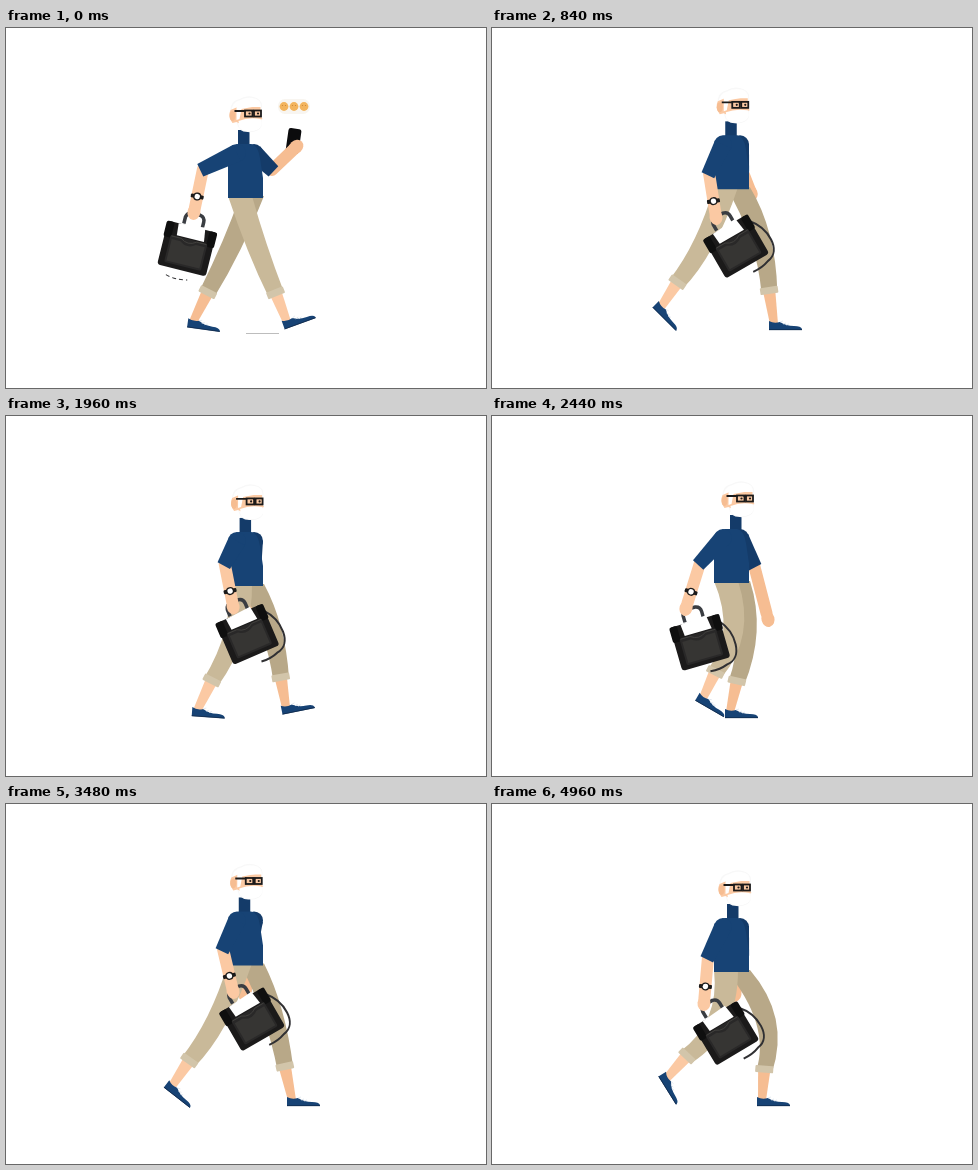
Recreate the animation shown at these times as an HTML page with a canvas. Size 480x360 px, loop 5000 ms.

```html
<!DOCTYPE html>
<html lang="en">
<head>
<meta charset="utf-8">
<title>Walking man</title>
<style>
html, body { margin: 0; width: 100%; height: 100%; overflow: hidden; background: #fff; }
canvas { display: block; }
</style>
</head>
<body>
<canvas id="stage" width="480" height="360"></canvas>
<script>
const ctx = document.getElementById('stage').getContext('2d');
const LOOP = 5000, STRIDE = 1340, STEP = STRIDE / 2, TICK = 40;
const NAVY = '#174375', NAVY_DARK = '#143b69', SKIN = '#fbc9a3', SKIN_DARK = '#f6bd92';
const NEAR_CLOTH = '#c9b999', FAR_CLOTH = '#b8a888', CUFF = '#d2c5aa', BLACK = '#1b1a1a';

// Key poses: time, then values.
const body = [[0, 170, -1], [150, 161, 0], [270, 168, 2], [430, 167, 5], [560, 168.5, 3]]; // hip y, head shift
// knee x, y, ankle x, y, foot angle
const nearLeg = [
  [0, 251, 219, 281, 293, -20], [50, 253, 216, 281, 295, -3], [180, 254, 214, 267, 295, 0],
  [270, 253, 215, 254, 295, 0], [430, 246, 216, 234, 295, 0], [670, 225, 217, 181, 292, 8],
  [800, 211, 217, 166, 281, 38], [840, 212, 216, 169, 278, 45], [940, 227, 218, 175, 273, 58],
  [1100, 243, 216, 211, 281, 30], [1220, 254, 214, 252, 288, 2]];
const farLeg = [
  [0, 226, 217, 187, 293, 8], [100, 227, 215, 179, 286, 24], [180, 236, 214, 184, 275, 45],
  [270, 242, 217, 190, 271, 55], [430, 254, 215, 222, 280, 30], [560, 265, 213, 264, 288, 0],
  [680, 266, 215, 293, 293, -18], [720, 266, 213, 293, 295, -4], [800, 267, 209, 286, 295, 0],
  [840, 269, 209, 282, 295, 0], [940, 276, 217, 270, 295, 0], [1100, 256, 216, 238, 295, 0]];
// elbow x, y, hand x, y
const nearArm = [
  [0, 197, 141, 188, 184], [100, 203, 140, 191, 185], [180, 211, 142, 199, 189],
  [430, 216, 150, 216, 200], [670, 219, 147, 229, 188], [800, 217, 145, 227, 187],
  [840, 217, 145, 224, 189], [940, 216, 153, 212, 199], [1100, 208, 147, 194, 192]];
const farArm = [
  [0, 263, 146, 294, 190], [180, 260, 145, 290, 191], [430, 258, 150, 272, 204],
  [670, 246, 150, 241, 196], [840, 244, 148, 240, 190], [940, 250, 150, 243, 190],
  [1100, 262, 149, 276, 203], [1220, 263, 148, 287, 197]];
const phoneArm = [
  [0, 266, 142, 290, 119], [240, 266, 144, 289, 138], [560, 258, 147, 273, 172],
  [840, 250, 142, 259, 165], [960, 254, 147, 262, 185], [1100, 262, 149, 276, 203]];
// center x, y, angle
const bagKeys = [
  [0, 181, 220, 14], [100, 180, 219, 21], [180, 185, 220, 23], [430, 213, 230, 0],
  [670, 247, 215, -28], [800, 246, 215, -30], [840, 244, 218, -30], [940, 234, 229, -31],
  [1100, 208, 226, -16]];

// Smooth periodic interpolation through the keys.
function sample(keys, time, period) {
  const t = time % period, n = keys.length;
  const key = i => {
    const k = keys[(i + n) % n], shift = Math.floor(i / n) * period;
    return [k[0] + shift, ...k.slice(1)];
  };
  let i = n - 1;
  while (keys[i][0] > t) i--;
  const [p, a, b, q] = [i - 1, i, i + 1, i + 2].map(key);
  const span = b[0] - a[0], u = (t - a[0]) / span;
  return a.slice(1).map((v, j) => {
    const w = b[j + 1];
    const ma = (w - p[j + 1]) / (b[0] - p[0]) * span;
    const mb = (q[j + 1] - v) / (q[0] - a[0]) * span;
    const d = w - v;
    return v + u * (ma + u * (3 * d - 2 * ma - mb + u * (ma + mb - 2 * d)));
  });
}

function shape(color, path) {
  ctx.fillStyle = color;
  ctx.fill(new Path2D(path));
}
function stroke(color, width, path) {
  ctx.strokeStyle = color;
  ctx.lineWidth = width;
  ctx.stroke(new Path2D(path));
}
function box(color, x, y, w, h, r = 0) {
  ctx.fillStyle = color;
  ctx.beginPath();
  ctx.roundRect(x, y, w, h, r);
  ctx.fill();
}
function oval(color, x, y, rx, ry = rx, turn = 0) {
  ctx.fillStyle = color;
  ctx.beginPath();
  ctx.ellipse(x, y, rx, ry, turn, 0, 7);
  ctx.fill();
}
function at(x, y, angle, draw) {
  ctx.save();
  ctx.translate(x, y);
  ctx.rotate(angle);
  draw();
  ctx.restore();
}
const rad = deg => deg * Math.PI / 180;
const mix = (a, b, f) => a + (b - a) * f;

function taper(color, x0, y0, x1, y1, w0, w1) {
  const length = Math.hypot(x1 - x0, y1 - y0);
  at(x0, y0, Math.atan2(y1 - y0, x1 - x0), () =>
    shape(color, `M0 ${-w0 / 2}L${length} ${-w1 / 2}V${w1 / 2}L0 ${w0 / 2}Z`));
}

function shoe(x, y, angle) {
  at(x, y, rad(angle), () => {
    shape(NAVY, 'M-5 -2Q0 1 6 -1Q12 3 20 3Q27 3 28 6V7H-5Z');
    stroke('#dfe5ec', 0.8, 'M6 -1l3 -1M9 1l3 -1M12 2l3 -1');
    stroke('#10294a', 0.8, 'M-5 6.7H28');
  });
}

function leg([kx, ky, ax, ay, angle], hx, hy, color) {
  const cx = mix(kx, ax, 0.65), cy = mix(ky, ay, 0.65);
  const shin = Math.atan2(ay - ky, ax - kx);
  taper(color === NEAR_CLOTH ? SKIN : SKIN_DARK, cx, cy, ax, ay + 1, 12, 8);
  shoe(ax, ay, angle);

  const nx = Math.sin(shin) * 8, ny = -Math.cos(shin) * 8;
  const bend = (Math.atan2(ky - hy, kx - hx) + shin) / 2;
  const mx = Math.sin(bend) * 10, my = -Math.cos(bend) * 10;
  const side = s => [
    2 * (kx + s * mx) - (hx + s * 12 + cx + s * nx) / 2,
    2 * (ky + s * my) - (hy + cy + s * ny) / 2];
  const [r, l] = [side(1), side(-1)].map(([x, y]) => [mix(kx, x, 0.75), mix(ky, y, 0.75)]);
  r[0] += mx * 0.25; r[1] += my * 0.25;
  l[0] -= mx * 0.25; l[1] -= my * 0.25;
  shape(color, `M${hx + 12} ${hy}Q${r} ${cx + nx} ${cy + ny}L${cx - nx} ${cy - ny}Q${l} ${hx - 12} ${hy}Z`);
  at(cx, cy, shin, () => box(CUFF, -6, -9, 7, 18, 1));
}

function arm([ex, ey, hx, hy], sx, sy, cloth, skin) {
  ctx.lineCap = 'round';
  stroke(skin, 12, `M${ex} ${ey}L${mix(ex, hx, 0.9)} ${mix(ey, hy, 0.9)}`);
  ctx.lineCap = 'butt';
  oval(skin, hx, hy, 8, 6.5, Math.atan2(hy - ey, hx - ex));
  oval(cloth, sx, sy, 9);
  taper(cloth, sx, sy, mix(sx, ex, 1.08), mix(sy, ey, 1.08), 18, 14);
}

function watch([ex, ey, hx, hy]) {
  at(mix(ex, hx, 0.64), mix(ey, hy, 0.64), Math.atan2(hy - ey, hx - ex) - Math.PI / 2, () => {
    box(BLACK, -6.5, -2, 13, 4, 1);
    oval(BLACK, 0, 0, 4);
    oval('#fff', 0, 0, 2.7);
  });
}

function bag([x, y, angle]) {
  at(x, y, rad(angle), () => {
    if (angle < 0) stroke('#303033', 2, 'M24 -15C37 0 38 27 20 29Q12 32 2 31');
    else {
      ctx.setLineDash([4, 3]);
      stroke('#303033', 1, 'M-14 31Q-4 34 8 31');
      ctx.setLineDash([]);
    }
    stroke('#3a3d42', 3.5, 'M-9 -23V-30Q-8 -35 -3 -35H5Q10 -34 10 -29V-23');
    box(BLACK, -25, -22, 50, 45, 3);
    box('#0f0f0f', -26, -22, 8, 16, 2);
    box('#0f0f0f', 18, -22, 8, 16, 2);
    shape('#fff', 'M-14 -22L13 -24L15 -10H-13Z');
    box('#292828', -19, -9, 38, 28, 2);
    shape('#363533', 'M-17 -5H-8Q0 1 8 -5H17V17H-17Z');
    stroke('#454441', 0.8, 'M-18 -8H-8Q0 -2 8 -8H18');
  });
}

function torso(y) {
  shape(NAVY, `M222 ${y}V${y - 38}Q221 ${y - 52} 233 ${y - 54}H245Q252 ${y - 53} 254 ${y - 40}L257 ${y - 20}V${y}Z`);
}

function head(x, y) {
  at(x, y, 0, () => {
    box(NAVY_DARK, 8.5, 34, 11.5, 18);
    shape('#f8f8f8', 'M1 17Q0 5 10 3Q18 -2 27 2Q34 5 32 14L32 30Q29 37 18 36Q9 36 7 26Z');
    shape('#fff', 'M2 16Q2 6 11 4Q18 0 27 3Q33 6 31 14V30Q28 36 18 35Q10 35 8 26Z');
    shape(SKIN, 'M8 11H31V20L33 23Q28 25 22 23Q14 24 11 28L7 26L3 27Q-2 20 1 14Z');
    shape('#fff', 'M7 8Q16 4 28 10L12 13L10 23L7 24Z');
    oval(SKIN_DARK, 3, 20, 3, 5);
    shape('#fff', 'M9 25Q19 21 31 23Q34 29 29 33Q18 38 10 32Z');
    ctx.strokeStyle = BLACK;
    ctx.lineWidth = 1.8;
    ctx.strokeRect(15.5, 14.5, 7.5, 6);
    ctx.strokeRect(24.5, 14.5, 7, 6);
    stroke(BLACK, 1.8, 'M5 15H16M22 15H25');
    oval(BLACK, 20, 17.5, 1.1);
    oval(BLACK, 28.5, 17.5, 1.1);
  });
}

function phone(x, y, angle) {
  at(x, y, angle, () => box('#0b0b0d', -6.5, -12.5, 13, 25, 2.5));
}

function bubble() {
  box('#f8f5f0', 272, 71, 32, 15, 7);
  for (const x of [278, 288, 298]) {
    oval('#f3b45d', x, 78.5, 4.4);
    oval('#c98533', x - 1.5, 77.5, 0.6);
    oval('#c98533', x + 1.5, 77.5, 0.6);
  }
}

function draw(time) {
  ctx.fillStyle = '#fff';
  ctx.fillRect(0, 0, 480, 360);
  const [hip, lean] = sample(body, time, STEP);
  const pose = keys => sample(keys, time, STRIDE);
  const reach = time < 1100 ? sample(phoneArm, time, LOOP) : pose(farArm);
  const hold = pose(nearArm);

  if (time < TICK) box('#bdbdbd', 240, 305, 33, 1);
  if (time < 240) bubble();
  if (time < 720) phone(reach[2] - 2.5, reach[3] - 6, 0.14 + time / 900);
  arm(reach, 248, hip - 45, NAVY_DARK, SKIN_DARK);
  leg(pose(farLeg), 246, hip - 2, FAR_CLOTH);
  leg(pose(nearLeg), 234, hip - 2, NEAR_CLOTH);
  head(224.5 + lean, hip - 102);
  torso(hip);
  bag(pose(bagKeys));
  arm(hold, 231, hip - 45, NAVY, SKIN);
  watch(hold);
}

const start = performance.now();
function frame() {
  const time = (performance.now() - start) % LOOP;
  draw(Math.floor(time / TICK) * TICK);
  requestAnimationFrame(frame);
}
frame();
</script>
</body>
</html>
```
